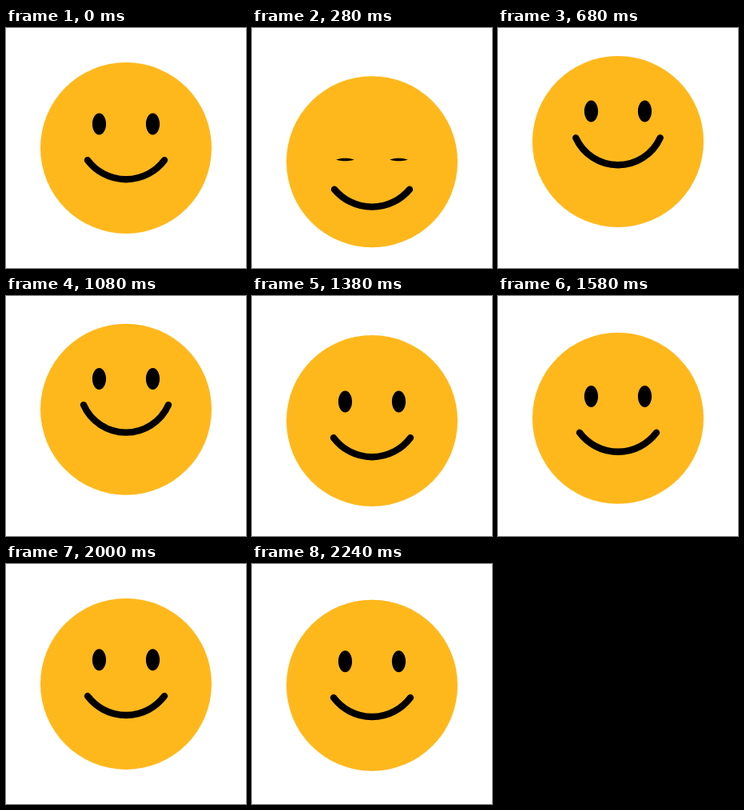
An HTML page that plays this animation: 300x300 px, repeating every 2.58 s.

```html
<!DOCTYPE html>
<html lang="en">
<head>
<meta charset="utf-8">
<title>Bouncing smile</title>
<style>
  html, body { margin: 0; width: 100%; height: 100%; overflow: hidden; background: #fff; }
  svg { display: block; width: 100%; height: 100%; }
</style>
</head>
<body>
<svg viewBox="0 0 300 300">
  <circle id="head" cx="150" r="107" fill="#ffb81c"/>
  <path id="eyes"/>
  <path id="mouth" fill="none" stroke="#000" stroke-width="8.4" stroke-linecap="round"/>
</svg>
<script>
const LOOP = 2580, STEP = 20, LAST = 2240;

// Tracks of [time in ms, value]
const DROP = [[40, 0], [295, 17.4], [580, -5], [680, -8], [880, -9.8], [1080, -8.3],
  [1120, -7.6], [1380, 6], [1660, 1.2], [1780, -0.4], [1860, -0.7], [2000, -0.1], [2240, 1.7]];
const SQUINT = [[40, 0], [285, 1], [580, 0]];
const SMILE = [[40, 0], [285, -0.2], [580, 0.75], [680, 0.95], [880, 1.05], [1080, 1], [1380, 0]];
const PARALLAX = [[1780, 2], [2240, 1.1]];

// Slope at a key: flat at the ends and at turning points
function slope(keys, i) {
  const a = keys[i - 1], b = keys[i], c = keys[i + 1];
  if (!a || !c || (b[1] - a[1]) * (c[1] - b[1]) <= 0) return 0;
  return (c[1] - a[1]) / (c[0] - a[0]);
}

function sample(keys, t) {
  const next = keys.findIndex(key => key[0] > t);
  if (next === 0) return keys[0][1];
  if (next < 0) return keys[keys.length - 1][1];
  const [t0, v0] = keys[next - 1], [t1, v1] = keys[next];
  const span = t1 - t0, x = (t - t0) / span, y = 1 - x;
  return v0 * y * y * (1 + 2 * x) + v1 * x * x * (1 + 2 * y)
    + span * x * y * (slope(keys, next - 1) * y - slope(keys, next) * x);
}

// An oval that flattens into a pointed slit as squint goes from 0 to 1
function eyePath(x, y, squint) {
  const rx = 8.6 + 2.9 * squint, ry = 13.5 - 11.7 * squint;
  const hx = 0.552 * rx, hy = 0.552 * ry * (1 - squint);
  const half = s => `C${s * -rx + x} ${y - s * hy} ${x - s * hx} ${y - s * ry} ${x} ${y - s * ry}`
    + `S${x + s * rx} ${y - s * hy} ${x + s * rx} ${y}`;
  return `M${x - rx} ${y}${half(1)}${half(-1)}Z`;
}

function mouthPath(bottom, smile) {
  const w = 48 + 5 * smile, sag = 24 + 10.5 * smile;
  const r = (w * w + sag * sag) / (2 * sag), y = bottom - sag;
  return `M${150 - w} ${y}A${r} ${r} 0 0 0 ${150 + w} ${y}`;
}

const [head, eyes, mouth] = ['head', 'eyes', 'mouth'].map(id => document.getElementById(id));

function draw(now) {
  const t = Math.min(Math.floor(now % LOOP / STEP) * STEP, LAST);
  const drop = sample(DROP, t), squint = sample(SQUINT, t), smile = sample(SMILE, t);
  const shift = drop * sample(PARALLAX, t);
  const eyeY = 120 + shift + 10 * squint;
  head.setAttribute('cy', 150 + drop);
  eyes.setAttribute('d', eyePath(116.5, eyeY, squint) + eyePath(183.5, eyeY, squint));
  mouth.setAttribute('d', mouthPath(189.2 + shift - 2 * Math.max(smile, 0), smile));
}

const start = performance.now();
function tick() {
  draw(performance.now() - start);
  requestAnimationFrame(tick);
}
tick();
</script>
</body>
</html>
```
